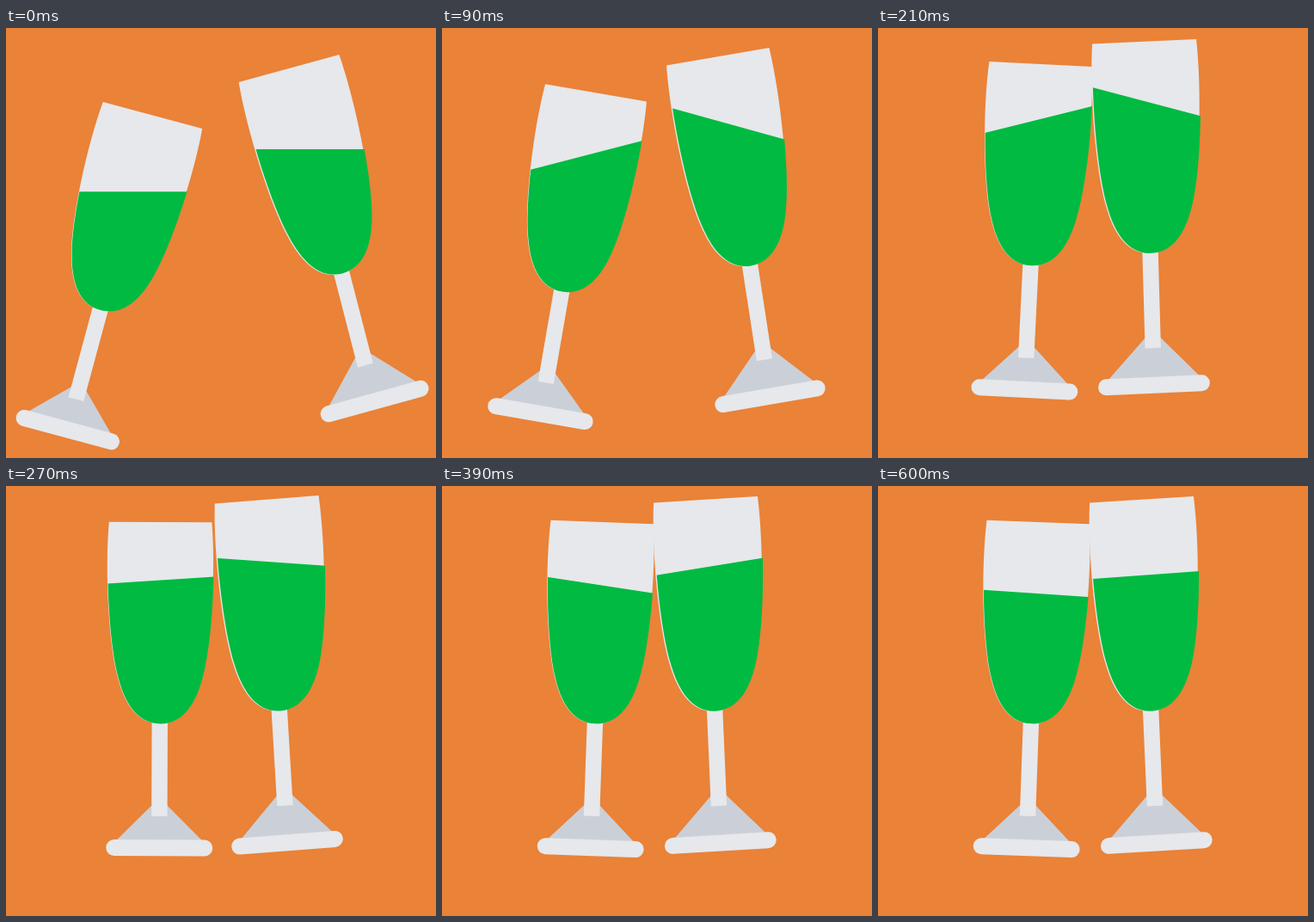
An HTML page with a canvas that plays this animation: 500x500 px, repeating every 1020 ms.

```html
<!DOCTYPE html>
<html lang="en">
<head>
<meta charset="utf-8">
<title>Cheers</title>
<style>
  html, body { margin: 0; width: 100%; height: 100%; overflow: hidden; background: #ea8238; }
  canvas { display: block; width: 100vw; height: 100vh; }
</style>
</head>
<body>
<canvas id="stage" width="500" height="500"></canvas>
<script>
const ctx = document.getElementById('stage').getContext('2d');
const LOOP = 1020, STEP = 30, END = 600;
const HIT = 205, REBOUND = 270, SETTLE = 330, CREST = 150;
const ORANGE = '#ea8238', GLASS = '#e6e8eb', FOOT = '#cbd0d8', DRINK = '#00ba41';

const rad = deg => deg * Math.PI / 180;
const lerp = (a, b, k) => a + (b - a) * k;
const ramp = (t, a, b) => Math.min(1, Math.max(0, (t - a) / (b - a)));

// Lengths run down the stem from the middle of the rim.
const glasses = [
  {
    from: { x: 170.5, y: 101.5, tilt: 15.1 }, rest: { x: 186.25, y: 42, tilt: 2.05 },
    recoil: 1.85, wave: -0.97, depth: 92, shift: 0.6,
    w: 1, h: 1, skew: 0, stem: 342, bar: 378.8, half: 62
  },
  {
    from: { x: 329, y: 47, tilt: -15.4 }, rest: { x: 306.5, y: 15.75, tilt: -3.45 },
    recoil: 0.95, wave: 1.03, depth: 97, shift: 1.3,
    w: 1.013, h: 1.05, skew: -0.0168, stem: 356.5, bar: 399.6, half: 65
  }
];

// Both glasses swing past their rest on impact, recoil, then settle.
function pose(g, t) {
  const k = ramp(t, 0, HIT);
  const rock = k - (1 + g.recoil) * ramp(t, HIT, REBOUND) + g.recoil * ramp(t, REBOUND, SETTLE);
  return {
    x: lerp(g.from.x, g.rest.x, k) + 3.6 * rock,
    y: lerp(g.from.y, g.rest.y, k),
    tilt: lerp(g.from.tilt, g.rest.tilt, k) + rock
  };
}

// Angle of the drink: a swing up, then ever smaller ones back and forth
const slosh = t =>
  25 * ramp(t, 0, CREST) - 38 * ramp(t, CREST, 365) + 23 * ramp(t, 365, 510) - 14 * ramp(t, 510, END);

// The surface rises on the way to the clink and sinks back slowly.
const rise = t => 30 * ramp(t, 0, CREST) - 21 * ramp(t, CREST, END);

function bowl(g, dx = 0) {
  const p = (x, y) => [x * g.w + dx, y * g.h];
  const curve = (a, b, c) => ctx.bezierCurveTo(...a, ...b, ...c);
  ctx.beginPath();
  ctx.moveTo(...p(-59.8, 0));
  ctx.lineTo(...p(59.8, 0));
  curve(p(64.5, 55), p(60, 141), p(49, 181));
  curve(p(42, 208), p(28, 234.5), p(0, 234.5));
  curve(p(-28, 234.5), p(-42, 208), p(-49, 181));
  curve(p(-60, 141), p(-64.5, 55), p(-59.8, 0));
  ctx.closePath();
}

function drawStand(g) {
  const foot = g.half - 11.5;
  ctx.fillStyle = FOOT;
  ctx.beginPath();
  ctx.moveTo(0, g.stem - 21.5);
  ctx.lineTo(foot, g.bar - 8);
  ctx.lineTo(-foot, g.bar - 8);
  ctx.fill();

  ctx.fillStyle = GLASS;
  ctx.fillRect(-9.2, 220, 18.4, g.stem - 220);
  ctx.beginPath();
  ctx.roundRect(-g.half, g.bar - 9.5, g.half * 2, 19, 9.5);
  ctx.fill();
}

// The surface keeps its own angle on the stage, cut to the bowl.
function drawDrink(g, t, tilt) {
  bowl(g, g.shift);
  ctx.clip();
  ctx.translate(0, g.depth - rise(t));
  ctx.transform(1, 0, -g.skew, 1, 0, 0);
  ctx.rotate(rad(g.wave * slosh(t) - tilt));
  ctx.fillStyle = DRINK;
  ctx.fillRect(-200, 0, 400, 300);
}

function drawGlass(g, t) {
  const { x, y, tilt } = pose(g, t);
  ctx.save();
  ctx.translate(x, y);
  ctx.rotate(rad(tilt));
  ctx.transform(1, 0, g.skew, 1, 0, 0);
  drawStand(g);
  bowl(g);
  ctx.fill();
  drawDrink(g, t, tilt);
  ctx.restore();
}

function draw(ms) {
  const t = Math.min(END, Math.floor((ms % LOOP) / STEP) * STEP);
  ctx.fillStyle = ORANGE;
  ctx.fillRect(0, 0, 500, 500);
  glasses.forEach(g => drawGlass(g, t));
}

const start = performance.now();
function tick() {
  draw(performance.now() - start);
  requestAnimationFrame(tick);
}
tick();
</script>
</body>
</html>
```
